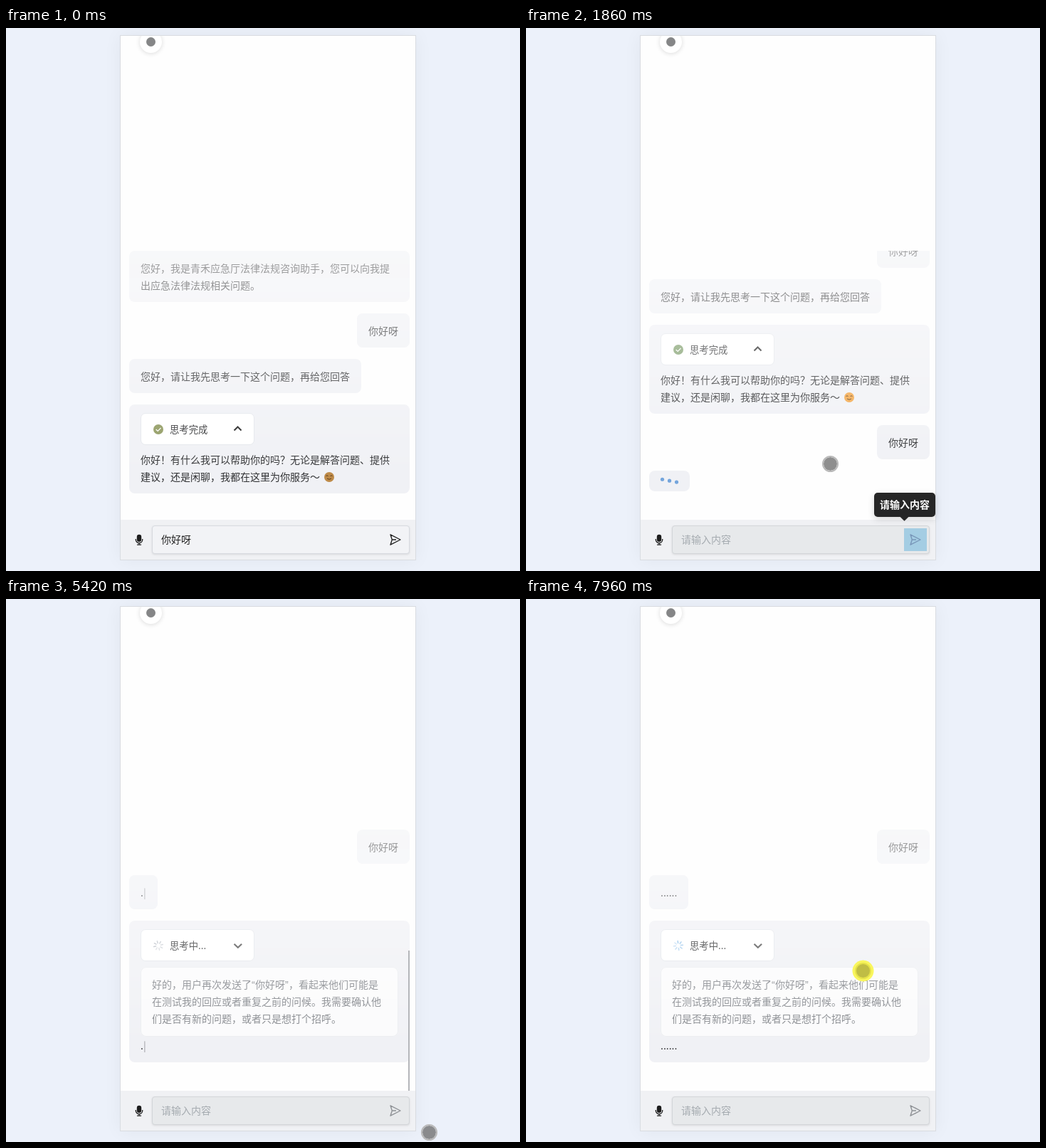
Write an HTML page that moves like this. It is 722x763 px and loops after 8000 ms.

```html
<!DOCTYPE html>
<html lang="zh-CN">
<head>
<meta charset="utf-8">
<title>咨询助手</title>
<style>
  * { box-sizing: border-box; }
  html, body { margin: 0; width: 100%; height: 100%; overflow: hidden; }
  body {
    position: relative; background: #ecf1fa; color: #303133;
    font: 14px/24px "Noto Sans CJK SC", "Noto Sans CJK", sans-serif;
    text-spacing-trim: space-all; white-space: nowrap;
  }
  svg { display: block; overflow: visible; fill: none; }
  [hidden] { display: none !important; }
  .abs, .panel, .panel > * { position: absolute; }
  .panel {
    left: 160px; top: 10px; width: 416px; height: 738px; overflow: hidden;
    background: #fefefe; border: 1px solid #d9dce1;
  }
  .shadow { left: 160px; top: 10px; width: 416px; height: 738px; box-shadow: 0 0 24px rgba(0, 0, 0, .05); }
  .avatar {
    left: 27px; top: -7px; width: 31px; height: 31px; border-radius: 50%;
    background: #fff; box-shadow: 0 1px 6px rgba(0, 0, 0, .14);
  }
  .avatar::after {
    content: ""; position: absolute; left: 9px; top: 9px; width: 13px; height: 13px;
    border-radius: 50%; background: #858687;
  }

  .chat {
    left: 0; top: 302px; width: 414px; height: 378px; overflow: hidden;
    -webkit-mask-image: linear-gradient(rgba(0, 0, 0, .43), #000 84%);
    mask-image: linear-gradient(rgba(0, 0, 0, .43), #000 84%);
  }
  .log { display: flex; flex-direction: column; align-items: flex-start; gap: 16px; padding: 0 8px 0 12px; }
  .bubble { padding: 12px 16px; background: #f0f1f5; border-radius: 8px; flex: none; }
  .wide { width: 394px; }
  .mine { align-self: flex-end; }
  .dots { width: 57px; height: 29px; padding: 0; }
  .card {
    position: relative; width: 160px; height: 45px; margin-bottom: 8px; padding-left: 40px;
    background: #fff; border: 1px solid #e4e7ec; border-radius: 7px; font-size: 13.333px; line-height: 43px;
  }
  .card svg { position: absolute; left: 0; top: 0; }
  .thought {
    height: 98px; padding: 12px 16px; background: #fbfbfc; border-radius: 8px;
    box-shadow: inset 0 0 0 1px #eceef1; color: #85888d;
  }
  .thought i { font: 14px/1 "Liberation Sans", sans-serif; display: inline-block; width: 5px; }
  .caret { color: #96989c; }
  .emoji { display: inline-block; vertical-align: -2px; margin-left: 3px; }
  .check { fill: #8f995f; }
  .face { fill: #bd8a48; }
  .later .check { fill: #7f9e6c; }
  .later .face { fill: #f2a545; }
  .scrollbar { left: 404px; top: 483px; width: 2px; height: 197px; background: #b4b6ba; }

  .bar { left: 0; top: 680px; width: 414px; height: 56px; background: #f0f1f4; }
  .input {
    left: 44px; top: 688px; width: 362px; height: 40px; padding-left: 12px; line-height: 36px;
    background: #f2f3f6; border: 1px solid #d7dadf; border-radius: 4px;
    box-shadow: 0 1px 3px rgba(0, 0, 0, .1); color: #222;
  }
  .input.empty { color: #b0b3b8; }
  .input.focus { border-color: #86aee6; box-shadow: none; }
  .input.off { background: #e7e9eb; border-color: #d3d6d9; color: #a5abb0; }
  .halo { left: 370px; top: 692px; width: 32px; height: 32px; border-radius: 50%; background: #d6d8da; }
  .halo.picked { border-radius: 0; background: #a4cde3; }
  .send { left: 0; top: 0; stroke: #222; }
  .tip {
    left: 489px; top: 653px; width: 86px; height: 34px; border-radius: 5px; background: #262626;
    color: #fff; font-weight: bold; line-height: 33px; text-align: center;
    box-shadow: 0 3px 10px rgba(0, 0, 0, .16);
  }
  .tip::after {
    content: ""; position: absolute; left: 38px; top: 29px; width: 9px; height: 9px;
    background: #262626; transform: rotate(45deg);
  }
  .cursor {
    left: -11.5px; top: -11.5px; width: 23px; height: 23px; border-radius: 50%;
    background: rgba(105, 105, 105, .74); border: 2px solid #b9b9b9; background-clip: padding-box;
  }
  .cursor.click {
    border-color: #e6e24a; background: #c0bd45;
    box-shadow: 0 0 0 3.5px #f9f65e;
  }
</style>
</head>
<body>
<div class="abs shadow"></div>
<div class="panel">
  <div class="avatar"></div>
  <div class="chat">
    <div class="log" id="log">
      <div class="bubble wide">您好，我是青禾应急厅法律法规咨询助手，您可以向我提<br>出应急法律法规相关问题。</div>
      <div class="bubble mine">你好呀</div>
      <div class="bubble">您好，请让我先思考一下这个问题，再给您回答</div>
      <div class="bubble wide">
        <div class="card">思考完成
          <svg width="158" height="43">
            <circle class="check" cx="24" cy="22" r="7"/>
            <path d="M20.7 22l2.5 2.4 4.3-4.4" stroke="#fff" stroke-width="1.2"/>
            <path d="M130.5 23.5l5-5 5 5" stroke="#222" stroke-width="2"/>
          </svg>
        </div>
        你好！有什么我可以帮助你的吗？无论是解答问题、提供<br>建议，还是闲聊，我都在这里为你服务～
        <svg class="emoji" width="14" height="14">
          <circle class="face" cx="7" cy="7" r="7"/>
          <path d="M2.5 5.5q1.5-1.5 3 0M8.5 5.5q1.5-1.5 3 0M4 9q3 2.5 6 0" stroke="#5b3b1c"/>
        </svg>
      </div>
      <div class="bubble mine" id="question">你好呀</div>
      <div class="bubble dots" id="dots">
        <svg width="57" height="29">
          <g fill="#74a5dc"><circle cx="18.5" r="2.6"/><circle cx="28.5" r="2.6"/><circle cx="38.5" r="2.6"/></g>
        </svg>
      </div>
      <div class="bubble reply typed"></div>
      <div class="bubble wide reply">
        <div class="card">思考中...
          <svg width="158" height="43">
            <g id="spinner" stroke-width="1.5" stroke-linecap="round"></g>
            <path d="M130.5 19.8l5.3 5 5.3-5" stroke="#505050" stroke-width="2.2"/>
          </svg>
        </div>
        <div class="thought">好的，用户再次发送了<i>“</i>你好呀<i>”</i>，看起来他们可能是<br>在测试我的回应或者重复之前的问候。我需要确认他<br>们是否有新的问题，或者只是想打个招呼。</div>
        <div class="typed"></div>
      </div>
    </div>
  </div>
  <div class="scrollbar" id="scrollbar"></div>
  <div class="bar"></div>
  <svg style="left:0;top:0" width="1" height="1">
    <rect x="22.8" y="700.7" width="6.4" height="10.3" rx="3.2" fill="#1d1d1d"/>
    <path d="M21.3 707v1a4.7 4.7 0 0 0 9.4 0v-1M26 712.7v2.5M23 715.2h6" stroke="#1d1d1d" stroke-width="1.3"/>
  </svg>
  <div class="input" id="input"></div>
  <div class="halo" id="halo"></div>
  <svg class="send" id="send" width="1" height="1">
    <path d="M379 700.8L393 708 379 715.2 381.3 708ZM381.3 708H387" stroke-width="1.4" stroke-linejoin="round"/>
  </svg>
</div>
<div class="abs tip" id="tip">请输入内容</div>
<div class="abs cursor" id="cursor"></div>

<script>
const LOOP = 8000;
const SENT = 750, SCROLLED = 960, HINT = 1100, HINT_END = 2600, HALO_END = 4200, REPLY = 5200;

// Pointer route: time, x, y
const route = [
  [120, 581, 760], [400, 541, 725], [550, 549, 722], [1520, 549, 722], [1580, 529, 726],
  [1860, 427, 612], [2410, 425, 609], [2700, 405, 635], [3030, 384, 660], [3300, 380, 662],
  [4590, 311, 670], [4660, 345, 690], [4730, 428, 712], [4800, 566, 754], [4870, 594, 749],
  [5630, 594, 749], [5700, 559, 730], [6300, 345, 608], [6500, 328, 488], [7340, 328, 488],
  [7500, 370, 470], [7800, 473, 522], [LOOP, 473, 522]
];

const $ = id => document.getElementById(id);
const between = (t, from, to) => t >= from && t < to;
const spinner = $("spinner");
const loadingDots = document.querySelectorAll("#dots circle");
const replies = document.querySelectorAll(".reply");
const typed = document.querySelectorAll(".typed");

spinner.innerHTML = Array.from({ length: 8 }, (_, i) =>
  `<path d="M0-3.5V-6.5" transform="rotate(${i * 45})" opacity="${1 - i * 0.07}"/>`).join("");

function pointerAt(t) {
  const next = Math.max(1, route.findIndex(p => p[0] > t));
  const [t0, x0, y0] = route[next - 1], [t1, x1, y1] = route[next];
  const k = (t - t0) / (t1 - t0);
  return [x0 + (x1 - x0) * k, y0 + (y1 - y0) * k];
}

function drawChat(t) {
  const scroll = t < SCROLLED ? 0 : t < REPLY ? 112 : 346;
  $("log").style.transform = `translateY(${-scroll}px)`;
  $("log").classList.toggle("later", t >= SCROLLED);
  $("question").hidden = t < SENT;
  $("dots").hidden = !between(t, SCROLLED, REPLY);
  replies.forEach(r => r.hidden = t < REPLY);
  $("scrollbar").hidden = !between(t, REPLY, 6200);

  loadingDots.forEach((dot, i) => {
    const angle = (t - 1900) / 1020 * 2 * Math.PI - i * 1.3;
    dot.setAttribute("cy", 14.2 - 2 * Math.cos(angle));
  });

  const count = Math.max(0, Math.min(6, Math.floor((t - 5000) / 350)));
  const caret = t < 7250 ? '<span class="caret">|</span>' : "";
  typed.forEach(el => el.innerHTML = ".".repeat(count) + caret);
  spinner.setAttribute("transform", `translate(24 22) rotate(${t * 0.18})`);
  spinner.setAttribute("stroke", t < 6500 ? "#b9bec6" : "#8fc0ea");
}

function drawInput(t) {
  const off = t >= SCROLLED, picked = between(t, HINT, HINT_END);
  $("input").textContent = t < SENT ? "你好呀" : "请输入内容";
  $("input").className = "input" + (t < SENT ? "" : off ? " empty off" : " empty focus");
  $("halo").hidden = !between(t, HINT, HALO_END);
  $("halo").classList.toggle("picked", picked);
  $("send").style.stroke = picked ? "#7896b8" : off ? "#8f9296" : "#222";
  $("tip").hidden = !picked;
}

function drawCursor(t) {
  const [x, y] = pointerAt(t);
  $("cursor").hidden = t < route[0][0];
  $("cursor").style.transform = `translate(${x}px, ${y}px)`;
  $("cursor").classList.toggle("click", between(t, SENT, 820) || t >= 7800);
}

const start = performance.now();
function frame() {
  const t = (performance.now() - start) % LOOP;
  drawChat(t);
  drawInput(t);
  drawCursor(t);
  requestAnimationFrame(frame);
}
frame();
</script>
</body>
</html>
```
